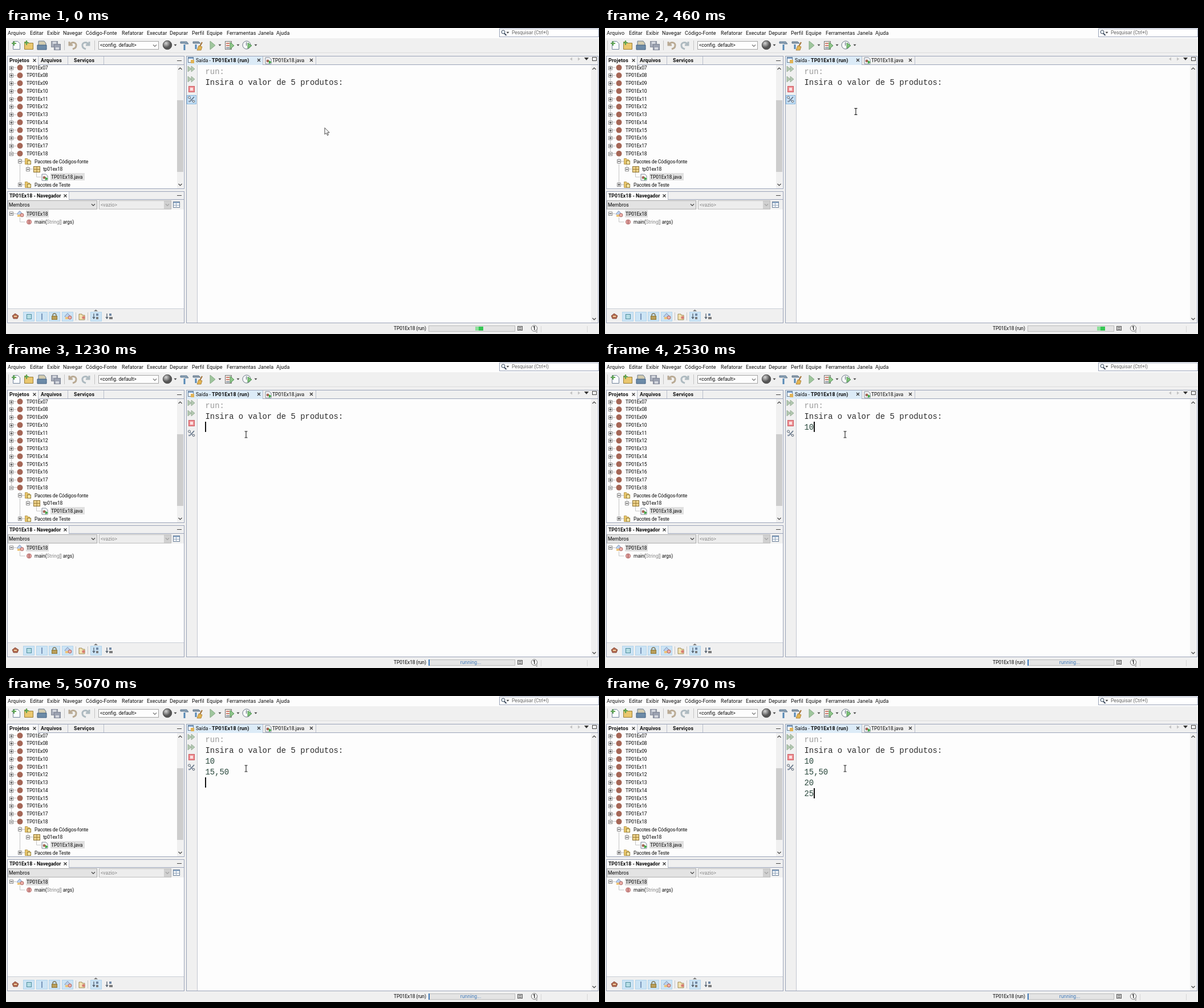
Animation of 1040x538 px, one loop 8000 ms. Source, as an HTML page:

```html
<!DOCTYPE html>
<html lang="pt">
<head>
<meta charset="utf-8">
<style>
html, body { margin: 0; width: 100%; height: 100%; overflow: hidden; background: #f0f0f0; }
svg { display: block; width: 1040px; height: 538px; }
text { font-family: Roboto, "Open Sans", sans-serif; white-space: pre; }
.mono { font: 13.9px "Liberation Mono", monospace; }
rect { shape-rendering: crispEdges; }
</style>
</head>
<body>
<svg id="stage" viewBox="0 0 1040 538"></svg>
<script>
const LOOP = 8000, EDGE = '#9aa3b8', INK = '#0c0c0c';
const out = [];
const add = s => out.push(s);

const rect = (x, y, w, h, fill) => add(`<rect x="${x}" y="${y}" width="${w}" height="${h}" fill="${fill}"/>`);
const box = (x, y, w, h, fill, edge = EDGE) => { rect(x, y, w, h, edge); rect(x + 1, y + 1, w - 2, h - 2, fill); };
const circle = (x, y, r, fill, edge = 'none') => add(`<circle cx="${x}" cy="${y}" r="${r}" fill="${fill}" stroke="${edge}"/>`);
const shape = (d, fill, edge = 'none', w = 1) => add(`<path d="${d}" fill="${fill}" stroke="${edge}" stroke-width="${w}"/>`);
const line = (d, color = INK, w = 1) => shape(d, 'none', color, w);
const text = (x, y, s, { size = 8.6, gap = -0.2, fill = INK, bold = false, anchor = 'start' } = {}) =>
  add(`<text x="${x}" y="${Math.round(y)}" font-size="${size}" letter-spacing="${gap}" fill="${fill}" text-anchor="${anchor}" font-weight="${bold ? 700 : 400}">${s}</text>`);
const title = (x, y, s, gap = 0.2, size = 8.9) => text(x, y, s, { size, gap, bold: true });

const close = (x, y) => line(`M${x - 2.5} ${y - 2.5}l5 5m0 -5l-5 5`, '#333', 1.2);
const chevron = (x, y, dir = 1, color = '#444') => line(`M${x - 3} ${y - 1.5 * dir}l3 ${3 * dir}l3 ${-3 * dir}`, color, 1.2);
const drop = (x, y, color = '#444', r = 2.5) => shape(`M${x - r} ${y - r / 2}h${2 * r}l${-r} ${r * 1.2}z`, color);
const plus = (x, y) => line(`M${x - 4} ${y}h8m-4 -4v8`, '#5fa653', 2.2);
const grip = x => line(`M${x + .5} 22v17`, '#c4c4c4');

function expander(x, y, open) {
  box(x - 3, y - 3, 7, 7, '#fff', '#8a8a8a');
  line(`M${x - 1.5} ${y + .5}h4` + (open ? '' : 'm-2 -2v4'), '#222');
}
function folder(x, y) {
  shape(`M${x + .5} ${y - 5.5}h4l1 2h3v8h-8z`, '#e9c66a', '#a88a3c', .8);
  box(x + 4, y - 2, 7, 7, '#f4e3a0', '#917a35');
}
function javaFile(x, y) {
  shape(`M${x} ${y - 5}h7l3 3v8h-10z`, '#f5f7fa', '#75808f', .9);
  circle(x + 4, y + 1, 2.4, '#a56757');
  shape(`M${x + 6} ${y}l5 3l-5 3z`, '#3da842');
}
function scrollbar(x, top, bottom) {
  rect(x, top, 11, bottom - top, '#f0f0f0');
  chevron(x + 5.5, top + 6.5, -1);
  chevron(x + 5.5, bottom - 6.5);
}
function wrench(x, y) {
  line(`M${x - 2} ${y + 4}l7 -8`, '#5f7084', 1.6);
  line(`M${x - 2} ${y - 1}l5 5`, '#8693a5', 1.6);
  circle(x - 3.5, y - 3, 2, '#f3f5f7', '#55606e');
  circle(x + 4, y + 4, 1.8, '#f3f5f7', '#55606e');
  circle(x - 3.5, y + 4, 1.5, '#8693a5');
}
function members(x, y) {
  shape(`M${x - 6} ${y}l5 -5.5l5 5.5l-5 5z`, '#bcd0ec', '#6b7fa3', .8);
  rect(x - 5, y + 1, 5, 4, '#edc479');
  circle(x + 3, y + 2, 3, '#eeb0aa', '#a8625e');
}

function menuAndTools() {
  rect(0, 0, 1040, 18, '#fdfdfd');
  const menu = { Arquivo: 3, Editar: 42, Exibir: 72, Navegar: 100, 'Código-Fonte': 140, Refatorar: 203, Executar: 247,
    Depurar: 287, Perfil: 326, Equipe: 352, Ferramentas: 387, Janela: 442, Ajuda: 474 };
  for (const [name, x] of Object.entries(menu)) text(x, 12, name, { size: 9, gap: 0.08 });
  box(865, 1, 175, 15, '#fff');
  circle(872, 7, 3, '#eef5fb', '#38465a');
  line('M874 9.5l3.5 3.5', '#38465a', 1.8);
  drop(880, 8);
  text(887, 11, 'Pesquisar (Ctrl+I)', { fill: '#666', gap: -0.1 });

  [4, 102, 155].forEach(grip);
  shape('M12.5 23.5h8l4 4v10h-12z', '#fafcff', '#718399'); plus(14, 27);
  shape('M32.5 24.5h5l2 2h8v11h-15z', '#eac76f', '#9b7d35'); plus(36, 26);
  shape('M57 23h10l3 4v9h-13z', '#d3ccb0', '#66788e');
  shape('M55 30h16v8h-16z', '#6d8ba8', '#3f5f80');
  box(79, 23, 12, 11, '#a7acb9', '#858a98'); box(84, 28, 12, 11, '#9ca2b1', '#7e8494');
  rect(82, 24, 6, 4, '#d4d7de'); rect(87, 34, 6, 4, '#d4d7de');
  line('M111 24v6h6M112 30c3 -7 12 -5 11 1c0 3 -2 5 -6 6', '#b9aa94', 3);
  line('M146 24v6h-6M145 30c-3 -7 -12 -5 -11 1c0 3 2 5 6 6', '#aebac0', 3);
  box(162, 23, 106, 15, '#fdfdfd', '#a4a4a4');
  text(165, 33, '&lt;config. default&gt;', { gap: 0 });
  chevron(261, 31, 1, '#777');
  circle(283, 30, 7.7, 'url(#globe)', '#4d4d4d');
  line('M313 29v10', '#5688b5', 3); shape('M306 24h11l3 4h-5l-2 -1h-7z', '#8ba2b6', '#4c6781', .8);
  line('M333 29v8', '#5688b5', 3); shape('M328 24h10l3 3h-13z', '#8f9daa', '#4c6781', .8);
  line('M344 25l-4 7', '#9f6d31', 2); shape('M338 31l6 2l-2 6h-7z', '#e3b553', '#a17832', .8);
  shape('M358 23l9 7.5l-9 7.5z', '#9fc69d', '#86a985');
  box(384, 23, 12, 15, '#f1eee9', '#777'); rect(386, 26, 6, 2, '#d28073'); rect(386, 30, 6, 2, '#d28073'); rect(386, 34, 6, 2, '#8795a5');
  shape('M393 25l7 6l-7 6z', '#8fc68a', '#3f8740', .8);
  circle(422, 30, 7, '#fbfcfd', '#667381'); line('M421.5 25v6', '#667381', 1.2);
  shape('M424 26l7 5l-7 5z', '#7fc47b', '#3f8740', .8);
  [297, 375, 407, 438].forEach(x => drop(x, 30));
}

function projects() {
  box(2, 49, 311, 234, '#fdfdfd');
  rect(3, 50, 309, 14, '#f0f0f0'); rect(3, 50, 53, 15, '#fdfdfd');
  rect(56, 64, 256, 1, EDGE);
  [56, 108, 171].forEach(x => rect(x, 50, 1, 14, '#b9bfcc'));
  title(6, 60, 'Projetos'); close(50, 57); title(61, 60, 'Arquivos'); title(119, 60, 'Serviços');
  rect(300, 57, 8, 1, '#444');

  const rowY = i => 69.6 + 13.75 * i;
  line('M9.5 66v155M12 220.5h8M24.5 228v48M24 234.5h9M38.5 241v7h9M53.5 254v8h8M24 275.5h9', '#c5c5c5');
  for (let i = 0; i < 12; i++) {
    const y = rowY(i);
    line(`M13 ${Math.floor(y) + .5}h5`, '#c5c5c5');
    expander(9, Math.round(y), i === 11);
    circle(24.5, y, 5, '#a56757');
    text(36, y + 3, 'TP01Ex' + String(i + 7).padStart(2, '0'));
  }
  expander(24, 234, true); folder(33, 235); text(50, rowY(12) + 3, 'Pacotes de Códigos-fonte');
  expander(38, 248, true);
  box(48, 243, 12, 11, '#ecd18a', '#8e7434'); line('M54 244v9M49 248.5h10', '#9b7d35');
  text(65, rowY(13) + 3, 'tp01ex18');
  rect(78, 255, 60, 13, '#e0e0e0'); javaFile(63, 262); text(79, rowY(14) + 3, 'TP01Ex18.java', { gap: -0.1 });
  expander(24, 275, false); folder(33, 276); text(50, rowY(15) + 3, 'Pacotes de Teste');
  scrollbar(300, 65, 282);
  rect(300, 127, 11, 126, '#cdcdcd');
}

function memberPanel() {
  box(2, 287, 311, 232, '#fdfdfd');
  rect(3, 288, 309, 31, '#f0f0f0'); rect(3, 288, 107, 14, '#fdfdfd');
  rect(110, 288, 1, 14, '#b9bfcc'); rect(110, 301, 202, 1, EDGE);
  title(6, 298, 'TP01Ex18 - Navegador', 0, 8.7); close(104, 295); rect(300, 294, 8, 1, '#444');
  box(3, 303, 157, 16, '#e3e3e3', '#adadad'); text(5, 314, 'Membros', { gap: 0 }); chevron(153, 311);
  box(163, 303, 127, 16, '#ededed', '#bcbcbc'); text(166, 314, '&lt;vazio&gt;', { fill: '#888', gap: 0 });
  rect(277, 304, 12, 14, '#d0d0d0'); chevron(283, 311, 1, '#a5a5a5');
  box(293, 305, 12, 11, '#f9fbfd', '#6b7f98'); rect(294, 306, 10, 2, '#8fabc9'); line('M298.5 308v8M294 311.5h10', '#8fa3ba');

  line('M13 326.5h5M24.5 333v8h9', '#c5c5c5');
  expander(9, 326, true); members(25, 327);
  rect(35, 320, 40, 13, '#e0e0e0'); text(36, 330, 'TP01Ex18');
  circle(40.5, 341, 4, '#e3a3a0', '#b06a68'); line('M40.5 338v6', '#8f4a4a');
  text(50, 344, 'main(<tspan fill="#888">String[]</tspan> args)', { gap: -0.1 });

  rect(3, 493, 309, 25, '#f0f0f0'); rect(3, 493, 309, 1, '#c9cdd6');
  shape('M154 498l3.5 -3l3.5 3z', '#777');
  [30, 53, 75, 98, 148].forEach(x => box(x, 499, 20, 17, '#cce4f5', '#b2d4ec'));
  shape('M11 506l5 -4l6 4l-2 5h-7z', '#b1684e', '#7d4636', .8); rect(14, 506, 5, 2, '#f0d5a3');
  box(36, 503, 9, 9, '#b5dce4', '#508e9e');
  rect(62, 502, 2, 11, '#7896bb');
  line('M82 507v-2a3 3 0 0 1 6 0v2', '#7d7657', 1.4); box(80, 506, 10, 7, '#b99e5a', '#8b7433');
  members(109, 507);
  rect(122, 500, 1, 14, '#c5c5c5');
  shape('M128 503h5l1 2h4v8h-10z', '#f3e2b3', '#8b7433', .8); circle(136, 509, 2.6, '#d77d72');
  rect(143, 500, 1, 14, '#c5c5c5');
  for (const x of [154, 177]) {
    line(`M${x} 502v9m-2 -3l2 3l2 -3`, '#4b5968', 1.2);
    rect(x + 4, 502, 4, 4, '#7189a5'); rect(x + 4, 508, x > 160 ? 6 : 4, 4, '#7b7b7b');
  }
}

function outputWindow() {
  box(316, 49, 723, 470, '#fdfdfd');
  rect(317, 50, 721, 14, '#f0f0f0'); rect(317, 50, 133, 15, '#dcebf7');
  rect(450, 50, 1, 14, '#b9bfcc'); rect(543, 50, 1, 14, '#b9bfcc'); rect(450, 64, 588, 1, EDGE);
  box(319, 51, 10, 10, '#f8fafc', '#66788e'); rect(320, 52, 8, 2, '#7ba2cc'); shape('M324 56h6v6h-6z', '#e1b356');
  text(333, 60, 'Saída -', { gap: 0 }); title(361, 60, 'TP01Ex18 (run)', 0.2); close(443.5, 56.5);
  javaFile(455, 57); text(467, 60, 'TP01Ex18.java', { gap: -0.05 }); close(535.5, 56.5);
  shape('M993 51.5v6l-4 -3z', '#c3c3c3'); shape('M1003 51.5v6l4 -3z', '#c3c3c3');
  drop(1018, 54, '#333', 4); box(1028, 51, 8, 7, '#f0f0f0', '#444');
  rect(317, 65, 18, 453, '#f0f0f0'); rect(335, 65, 1, 453, '#c2c6cf');
  for (const y of [72, 90]) for (const x of [319, 325]) shape(`M${x} ${y - 5}l6 5l-6 5z`, '#b3c9b1', '#8fa58d', .8);
  box(320, 102, 11, 11, '#ee8f93', '#cc5a61'); rect(323, 105, 5, 5, '#fbe1e1');
  add('<g id="toolFocus">'); box(317, 118, 17, 16, '#c7e0f4', '#82b5df'); add('</g>');
  wrench(325, 125);
  scrollbar(1026, 65, 518);
  add('<text class="mono" x="349.5" y="81" fill="#999">run:</text>');
  add('<text class="mono" x="349.5" y="100" fill="#2b2b2b">Insira o valor de 5 produtos:</text>');
  for (let i = 0; i < 4; i++) add(`<text class="mono typed" x="349.5" y="${119 + 19 * i}" fill="#28473b"></text>`);
  add('<rect id="caret" width="2" height="18" fill="#111"/>');
}

function statusBar() {
  text(680, 531, 'TP01Ex18 (run)');
  box(741, 523, 152, 11, '#e4e4e4', '#bcbcbc');
  add('<g id="chunk">'); rect(0, 525, 6, 7, '#8edf9b'); rect(6, 525, 8, 7, '#35c653'); add('</g>');
  add('<g id="running">'); rect(741, 523, 2, 11, '#3f78b8');
  text(815, 531, 'running...', { fill: '#3f78b8', anchor: 'middle', gap: 0.1 }); add('</g>');
  box(897, 524, 9, 8, '#d9d9d9', '#555'); line('M899 526.5h5M899 529.5h5', '#555');
  circle(926.5, 528, 5.2, '#fafafa', '#777'); shape('M928 532.5l3 3v-5z', '#fafafa', '#777', .8);
  text(926.5, 531, '1', { bold: true, anchor: 'middle', gap: 0 });
  [938, 1019].forEach(x => rect(x, 524, 1, 11, '#d6d6d6'));
}

add('<defs><radialGradient id="globe" cx=".35" cy=".3"><stop stop-color="#d5d5d5"/><stop offset="1" stop-color="#555"/></radialGradient></defs>');
rect(0, 0, 1040, 538, '#f0f0f0');
menuAndTools(); rect(0, 43, 1040, 1, '#dcdcdc');
projects(); memberPanel(); outputWindow(); statusBar();
add('<g id="arrow">'); shape('M0 0v11.5l2.7 -2.4l2 4.2l1.8 -.9l-2 -4h3.7z', '#fff', '#333', .9); add('</g>');
add('<g id="beam">'); line('M-2.5 -5.5h2l.5 .5l.5 -.5h2M0 -5v10M-2.5 5.5h2l.5 -.5l.5 .5h2', '#222', 1.1); add('</g>');
const $ = id => document.getElementById(id);
$('stage').innerHTML = out.join('');

const typedLines = [...document.querySelectorAll('.typed')];
const INPUT = '10\n15,50\n20\n25', CLICK = 1200;
// Time, characters typed, caret visible
const KEYS = [[0, 0, 0], [CLICK, 0, 1], [1700, 0, 0], [2200, 0, 1], [2300, 1, 1], [2530, 2, 1], [2700, 2, 0],
  [2870, 3, 1], [3300, 4, 1], [3800, 4, 0], [4000, 5, 1], [4200, 6, 1], [4500, 7, 1], [4770, 8, 1], [5000, 8, 0],
  [5040, 9, 1], [5600, 10, 1], [5770, 11, 1], [5970, 11, 0], [6170, 12, 1], [6700, 12, 0], [6850, 13, 1], [7270, 14, 1]];
const PATH = [[0, 559, 175.5], [200, 559, 175.5], [460, 440, 147], [860, 421, 127.5], [LOOP, 421, 127.5]];

const show = (id, on) => $(id).setAttribute('visibility', on ? 'visible' : 'hidden');
const move = (id, x, y) => $(id).setAttribute('transform', `translate(${x} ${y})`);

function pointerAt(t) {
  const i = PATH.findIndex((p, k) => k && t < p[0]);
  const [t0, x0, y0] = PATH[i - 1], [t1, x1, y1] = PATH[i];
  const u = (t - t0) / (t1 - t0), e = u * (2 - u);
  return [x0 + (x1 - x0) * e, y0 + (y1 - y0) * e];
}

function draw(t) {
  const [, count, caretOn] = KEYS.findLast(k => k[0] <= t);
  const lines = INPUT.slice(0, count).split('\n');
  typedLines.forEach((el, i) => { el.textContent = lines[i] || ''; });
  const row = lines.length - 1;
  move('caret', 349 + Math.round(lines[row].length * 8.34), 105 + 19 * row);
  show('caret', caretOn);

  const running = t >= CLICK;
  show('toolFocus', !running);
  show('running', running);
  show('chunk', !running);
  const travel = 823 + Math.floor(t / 33.3) * 3.1;
  move('chunk', Math.min(travel, 2 * 878 - travel), 0);

  const [x, y] = pointerAt(t);
  const onText = t >= 330;
  show('arrow', !onText); show('beam', onText);
  move('arrow', x, y); move('beam', x, y);
}

const start = performance.now();
function tick() {
  draw((performance.now() - start) % LOOP);
  requestAnimationFrame(tick);
}
tick();
</script>
</body>
</html>
```
